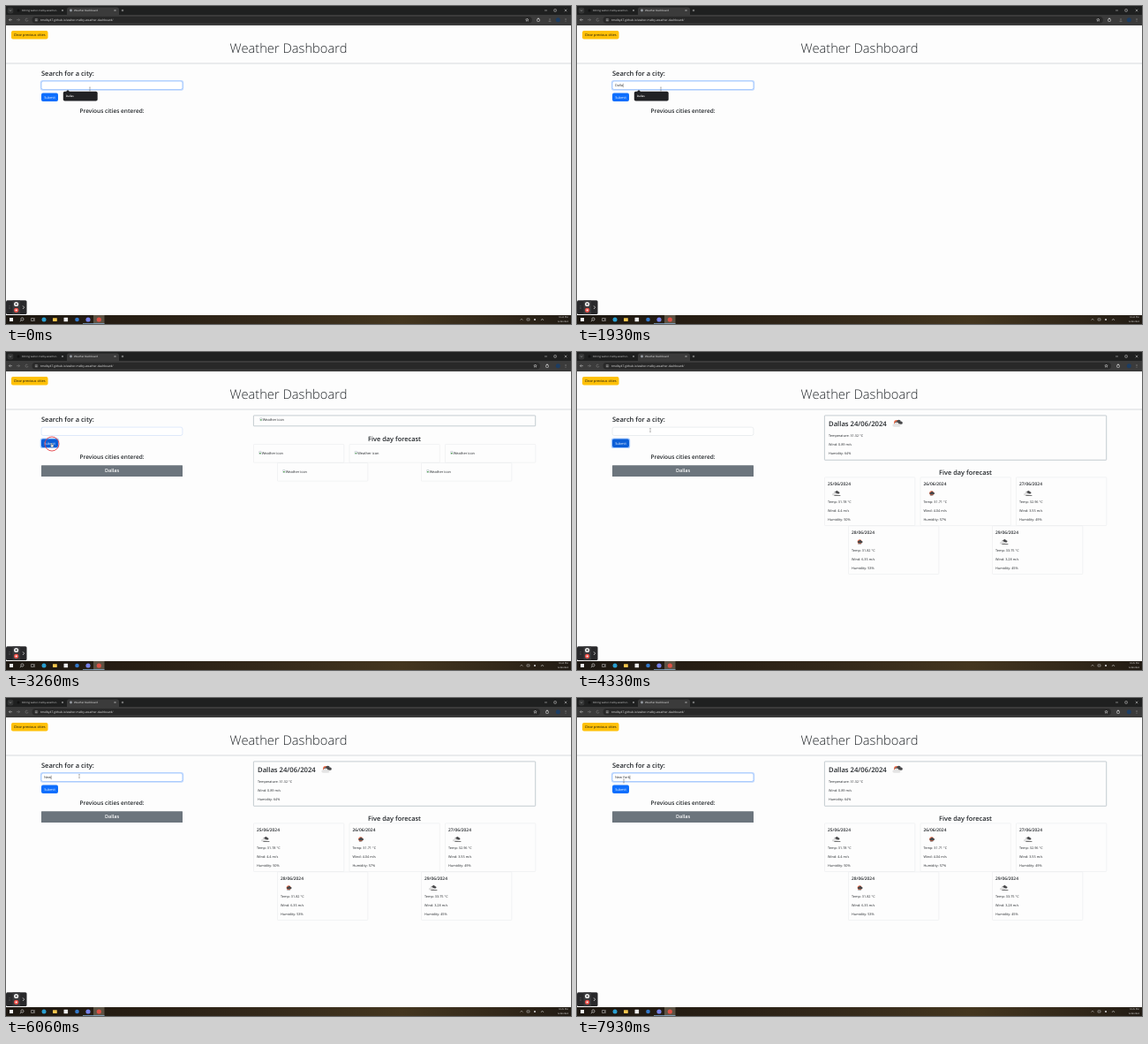
Animation of 640x360 px, one loop 8 s. Source, as an HTML page with a canvas:

```html
<!DOCTYPE html>
<html lang="en">
<head>
<meta charset="utf-8">
<title>Weather Dashboard</title>
<style>
html, body { margin: 0; width: 100%; height: 100%; overflow: hidden; background: #fdfdfd; }
canvas { display: block; width: 640px; height: 360px; }
</style>
</head>
<body>
<canvas id="stage"></canvas>
<script>
const LOOP = 8000;
const canvas = document.getElementById('stage');
const ctx = canvas.getContext('2d');
const ratio = window.devicePixelRatio || 1;
canvas.width = 640 * ratio;
canvas.height = 360 * ratio;

// Times (ms) of the events in the session
const TIME = { extension: 2400, click: 3060, result: 3130, data: 3460, clock: 3900, focus: 4600, popupOff: 5600 };

const TYPING = [
  { word: 'Dallas', start: 0, end: TIME.result, keys: [1200, 1330, 1530, 1730, 1870, 2060] },
  { word: 'New York', start: TIME.focus, end: LOOP, keys: [5600, 5800, 5990, 6260, 6400, 6530, 6660, 6860] }
];

// Pointer path: time, x, y
const POINTER = [[0, 95, 94], [2200, 95, 94], [2850, 52, 105], [3460, 52, 105],
  [4150, 83, 88.5], [7460, 83, 88.5], [7860, 53, 94], [8000, 53, 94]];

const DAYS = [
  { x: 280.5, row: 0, date: '25/06/2024', icon: 'cloud', temp: '31.78', wind: '4.4', hum: 50 },
  { x: 389, row: 0, date: '26/06/2024', icon: 'rain', temp: '31.71', wind: '4.04', hum: 57 },
  { x: 497.5, row: 0, date: '27/06/2024', icon: 'cloud', temp: '32.96', wind: '3.55', hum: 49 },
  { x: 307.5, row: 1, date: '28/06/2024', icon: 'rain', temp: '31.82', wind: '6.35', hum: 53 },
  { x: 470.5, row: 1, date: '29/06/2024', icon: 'cloud', temp: '33.75', wind: '3.28', hum: 45 }
];

function rect(x, y, w, h, fill, r = 0) {
  ctx.fillStyle = fill;
  ctx.beginPath();
  ctx.roundRect(x, y, w, h, r);
  ctx.fill();
}

function frame(x, y, w, h, color, r = 0, width = 0.6) {
  ctx.strokeStyle = color;
  ctx.lineWidth = width;
  ctx.beginPath();
  ctx.roundRect(x, y, w, h, r);
  ctx.stroke();
}

function dot(x, y, r, fill) {
  ctx.fillStyle = fill;
  ctx.beginPath();
  ctx.arc(x, y, r, 0, Math.PI * 2);
  ctx.fill();
}

function line(points, color, width = 0.5) {
  ctx.strokeStyle = color;
  ctx.lineWidth = width;
  ctx.beginPath();
  for (let i = 0; i < points.length; i += 2) ctx.lineTo(points[i], points[i + 1]);
  ctx.stroke();
}

// y is the middle of the capitals
function text(str, x, y, size, { color = '#212529', weight = 400, align = 'left' } = {}) {
  ctx.font = `${weight} ${size}px "Open Sans", "Noto Sans", sans-serif`;
  ctx.textAlign = align;
  ctx.fillStyle = color;
  ctx.fillText(str, x, y + size * 0.357);
}

function cross(x, y, r, color) {
  line([x - r, y - r, x + r, y + r], color);
  line([x - r, y + r, x + r, y - r], color);
}

function drawBrowser(t) {
  const pale = '#d8d8d8';
  rect(0, 0, 640, 11, '#1f2020');
  rect(0, 10, 640, 12, '#3b3b3b');
  rect(1.7, 1.8, 6.6, 6.6, '#343535', 2);
  line([4, 4.5, 5, 5.6, 6, 4.5], pale);
  dot(14, 5, 1.5, '#111');
  ctx.save();
  ctx.beginPath();
  ctx.rect(17, 0, 41, 10);
  ctx.clip();
  text('Editing walter-melby-weather-d', 18, 5, 2.85, { color: '#c8c8c8' });
  ctx.restore();
  cross(64, 5, 0.9, pale);

  rect(69, 1.5, 59, 10, '#3b3b3b', [2.5, 2.5, 0, 0]);
  dot(73.5, 5, 1.4, '#9a9fa6');
  text('Weather Dashboard', 77, 5, 2.9, { color: '#eee' });
  cross(123.5, 5, 0.9, pale);
  line([130.8, 5, 133.2, 5], pale);
  line([132, 3.8, 132, 6.2], pale);

  line([610, 5, 613, 5], pale);
  frame(620.8, 3.7, 2.5, 2.5, pale, 0.3, 0.5);
  cross(634, 5, 1.3, pale);

  line([7, 15.7, 3.5, 15.7, 5, 14.2], pale);
  line([3.5, 15.7, 5, 17.2], pale);
  line([12, 15.7, 15.5, 15.7, 14, 14.2], '#8a8a8a');
  line([15.5, 15.7, 14, 17.2], '#8a8a8a');
  ctx.beginPath();
  ctx.arc(23.5, 15.7, 1.5, 0.2, 5.4);
  ctx.stroke();

  const wide = t >= TIME.extension;
  const star = wide ? 599.5 : 590.3;
  rect(29.5, 12, star - 24, 7.6, '#282828', 3.8);
  dot(34.3, 15.8, 2.4, '#3b3b3b');
  line([33, 15, 35.6, 15], pale);
  line([33, 16.6, 35.6, 16.6], pale);
  text('tmelby47.github.io/walter-melby-weather-dashboard/', 39, 15.7, 3.3, { color: '#e6e6e6' });

  ctx.beginPath();
  for (let i = 0; i < 10; i++) {
    const a = i * Math.PI / 5 - Math.PI / 2, r = i % 2 ? 0.8 : 1.8;
    ctx.lineTo(star + r * Math.cos(a), 15.8 + r * Math.sin(a));
  }
  ctx.closePath();
  ctx.strokeStyle = pale;
  ctx.stroke();

  const puzzle = wide ? 613 : 603;
  frame(puzzle - 1.4, 14.6, 2.8, 2.8, pale, 0.5);
  dot(puzzle, 14.3, 0.8, pale);
  if (!wide) {
    line([616, 14, 616, 16.4], '#a0a0a0');
    line([614.6, 17.3, 617.4, 17.3], '#a0a0a0');
  }
  dot(625.3, 15.7, 2.5, '#1c3d63');
  for (const dy of [-1.4, 0, 1.4]) dot(634, 15.7 + dy, 0.4, pale);
}

function drawTaskbar(t) {
  const shade = ctx.createLinearGradient(0, 0, 640, 0);
  [[0, '#1d1812'], [0.2, '#261d13'], [0.45, '#33281a'], [0.7, '#44361f'], [0.9, '#302619'], [1, '#211b14']]
    .forEach(([at, color]) => shade.addColorStop(at, color));
  rect(0, 350, 640, 10, shade);

  rect(4, 353, 4, 4, '#eee');
  ctx.strokeStyle = '#eee';
  ctx.lineWidth = 0.6;
  ctx.beginPath();
  ctx.arc(18.4, 354.5, 1.6, 0, Math.PI * 2);
  ctx.stroke();
  line([17.2, 355.7, 15.9, 357.2], '#eee', 0.6);
  frame(28.5, 353.5, 2.8, 3, '#ccc', 0, 0.5);
  line([32.2, 353, 32.2, 357], '#ccc');

  rect(99, 350, 12.5, 10, '#5d5344');
  dot(43, 355, 2.5, '#2a9fd0');
  rect(53, 353.2, 4.8, 3.8, '#f4c64e', 0.4);
  rect(65.5, 352.7, 4.6, 4.6, '#ececec', 0.4);
  dot(80.5, 355, 2.3, '#3478c8');
  dot(93, 355, 2.6, '#7681e8');
  dot(105.3, 355, 2.6, '#dd5145');
  rect(87, 359.3, 12, 0.7, '#8cb6dd');
  rect(99, 359.3, 12.5, 0.7, '#8cb6dd');

  line([582.5, 355.6, 584, 354.2, 585.5, 355.6], '#ddd');
  frame(590, 353.8, 3, 2.2, '#ddd', 0, 0.45);
  dot(599, 355, 1, '#ddd');
  line([606, 356, 607.5, 354, 609, 356], '#ddd');
  const pale = { color: '#eee', align: 'center' };
  text(t < TIME.clock ? '10:24 PM' : '10:25 PM', 631, 352.6, 2.5, pale);
  text('6/24/2024', 631, 357.2, 2.5, pale);
}

function drawRecorder() {
  rect(0, 333.3, 23.5, 15.8, '#29292b', 1.5);
  rect(7.5, 333.3, 8.5, 15.8, '#39393b');
  for (const dy of [-1.5, 0, 1.5]) dot(4, 341.2 + dy, 0.35, '#aaa');
  dot(11.6, 337.5, 2.6, '#eee');
  rect(10.7, 336.6, 1.8, 1.8, '#444');
  dot(11.6, 344.3, 2.6, '#ee4f48');
  rect(10.7, 343.4, 1.8, 1.8, '#fff', 0.3);
  line([19, 339.4, 20.6, 341.2, 19, 343], '#eee', 0.7);
}

function drawSearch(t) {
  const entry = TYPING.find(e => t >= e.start && t < e.end);
  text('Search for a city:', 40, 76.8, 7.5, { weight: 600 });

  if (entry) rect(38.8, 83.9, 162.4, 11.8, '#c3dafe', 2.6);
  rect(40, 85, 160, 9.6, '#fff', 2);
  const fading = t >= TIME.result && t < TIME.data;
  frame(40.1, 85.1, 159.8, 9.4, entry ? '#86b7fe' : fading ? '#c9dcf8' : '#dee2e6', 2);

  if (entry) {
    const typed = entry.keys.filter(k => k <= t);
    const value = entry.word.slice(0, typed.length);
    text(value, 43, 90, 3.8);
    const since = t - (typed[typed.length - 1] ?? entry.start);
    if (typed.length && since % 1000 < 500) {
      const x = 43.3 + ctx.measureText(value).width;
      line([x, 87.7, x, 92.2], '#222', 0.4);
    }
  }

  const active = t >= 2800 && t < TIME.focus;
  if (t >= TIME.result && t < TIME.focus) rect(38.8, 97.4, 21.4, 11.6, '#a9ccff', 2.6);
  rect(40, 98.5, 19, 9.4, active ? '#0b5ed7' : '#0d6efd', 1.9);
  text('Submit', 49.5, 103.3, 3.85, { color: '#fff', align: 'center' });

  text('Previous cities entered:', 120, 118.6, 6.5, { weight: 600, align: 'center' });
  if (t >= TIME.result) {
    rect(40, 128.2, 160, 12.7, '#6c757d', 0.5);
    text('Dallas', 120, 134.4, 5.5, { weight: 600, color: '#fff', align: 'center' });
  }

  if (t < 2300 || (t >= TIME.focus && t < TIME.popupOff)) {
    ctx.fillStyle = '#202124';
    ctx.beginPath();
    ctx.moveTo(67.8, 97.2);
    ctx.lineTo(70, 95);
    ctx.lineTo(72.2, 97.2);
    ctx.fill();
    rect(64.8, 96.8, 38.9, 10.7, '#202124', 1.8);
    text('Dallas', 67.7, 102.3, 3.1, { color: '#f4f4f4', weight: 600 });
  }
}

function cloud(x, y, s, fill) {
  ctx.fillStyle = fill;
  ctx.beginPath();
  ctx.arc(x - 2 * s, y, 1.2 * s, 0, 7);
  ctx.arc(x, y - 0.8 * s, 1.7 * s, 0, 7);
  ctx.arc(x + 2 * s, y, 1.2 * s, 0, 7);
  ctx.rect(x - 2 * s, y - 0.4 * s, 4 * s, 1.6 * s);
  ctx.fill();
}

function weatherIcon(kind, x, y) {
  if (kind === 'sun') {
    dot(x - 0.5, y - 1, 3, '#ec6e4c');
    cloud(x + 2, y - 0.8, 1.35, '#48484a');
    cloud(x - 0.5, y + 2, 1.45, '#e4e4e4');
  } else if (kind === 'rain') {
    dot(x - 0.2, y - 0.4, 2.5, '#ec6e4c');
    cloud(x + 0.3, y, 0.9, '#48484a');
    for (const dx of [-1.2, 0, 1.2]) line([x + dx, y + 1.4, x + dx - 0.4, y + 2.7], '#48484a', 0.6);
  } else {
    cloud(x + 1, y - 0.7, 0.95, '#48484a');
    cloud(x - 1.3, y + 1.2, 1, '#dedede');
    line([x - 2, y + 2.4, x + 5, y + 2.4], '#555', 0.8);
  }
}

function brokenImage(x, y) {
  frame(x, y - 1.8, 2.3, 3, '#8c9aa8', 0.2, 0.35);
  rect(x + 0.3, y - 0.2, 1.7, 1.1, '#5ba85a');
  text('Weather icon', x + 3, y, 3.95);
}

function drawForecast(loaded) {
  frame(280.4, 71.9, 319.3, loaded ? 50.4 : 11.9, '#adb8bf', 0.5, 0.7);
  if (loaded) {
    text('Dallas 24/06/2024', 285, 81.5, 7.7, { weight: 600 });
    weatherIcon('sun', 362.5, 81);
    ['Temperature: 31.32 °C', 'Wind: 0.89 m/s', 'Humidity: 64%']
      .forEach((s, i) => text(s, 285, 95 + i * 10, 3.75));
  } else {
    brokenImage(287.7, 76.5);
  }
  text('Five day forecast', 440, loaded ? 136 : 98, 7.4, { weight: 600, align: 'center' });

  for (const day of DAYS) {
    const step = loaded ? 55 : 21;
    const top = (loaded ? 141.8 : 104.5) + day.row * step;
    frame(day.x, top, 102.3, step - 0.3, '#e6e8ea', 0.6, 0.5);
    if (!loaded) {
      brokenImage(day.x + 6.2, top + 9.8);
      continue;
    }
    const x = day.x + 3.5;
    text(day.date, x, top + 7.8, 4.85, { weight: 600 });
    weatherIcon(day.icon, x + 9.4, top + 18.3);
    [`Temp: ${day.temp} °C`, `Wind: ${day.wind} m/s`, `Humidity: ${day.hum}%`]
      .forEach((s, i) => text(s, x, top + 28.3 + i * 10, 3.8));
  }
}

function pointerAt(t) {
  const i = Math.max(1, POINTER.findIndex(p => p[0] > t));
  const [t0, x0, y0] = POINTER[i - 1], [t1, x1, y1] = POINTER[i];
  const k = (t - t0) / (t1 - t0), e = k * k * (3 - 2 * k);
  return [x0 + (x1 - x0) * e, y0 + (y1 - y0) * e];
}

function drawPointer(t) {
  const [x, y] = pointerAt(t);
  if (t >= TIME.click && t < TIME.data) {
    const r = 8 * Math.min(1, 0.5 + (t - TIME.click) / 300);
    ctx.strokeStyle = '#e8444a';
    ctx.lineWidth = 0.9;
    ctx.beginPath();
    ctx.arc(x, 104, r, 0, Math.PI * 2);
    ctx.stroke();
  }
  if (y > 98 && x < 59) {
    rect(x - 1.4, y - 0.2, 3.2, 3, '#fff', 0.8);
    frame(x - 1.4, y - 0.2, 3.2, 3, '#222', 0.8, 0.35);
    rect(x - 0.8, y - 2, 1, 3, '#fff', 0.5);
    frame(x - 0.8, y - 2, 1, 3, '#222', 0.5, 0.3);
  } else if (y > 84 && y < 95) {
    line([x, y - 2, x, y + 2], '#555', 0.4);
    line([x - 0.8, y - 2, x + 0.8, y - 2], '#555', 0.35);
    line([x - 0.8, y + 2, x + 0.8, y + 2], '#555', 0.35);
  } else {
    ctx.beginPath();
    [[0, 0], [0, 4.2], [1, 3.3], [2.8, 3]].forEach(([dx, dy]) => ctx.lineTo(x + dx, y + dy));
    ctx.closePath();
    ctx.fillStyle = '#fff';
    ctx.fill();
    ctx.strokeStyle = '#222';
    ctx.lineWidth = 0.35;
    ctx.stroke();
  }
}

function draw(t) {
  ctx.setTransform(ratio, 0, 0, ratio, 0, 0);
  ctx.textRendering = 'geometricPrecision';
  rect(0, 0, 640, 360, '#fdfdfd');
  drawBrowser(t);
  rect(6, 28, 41.5, 9.5, '#ffc107', 1.9);
  text('Clear previous cities', 26.7, 32.8, 3.85, { align: 'center', color: '#111' });
  text('Weather Dashboard', 320, 47.8, 14.7, { weight: 300, align: 'center' });
  line([0, 65, 640, 65], '#c6cbce', 0.7);
  drawSearch(t);
  if (t >= TIME.result) drawForecast(t >= TIME.data);
  drawTaskbar(t);
  drawRecorder();
  drawPointer(t);
}

const begin = performance.now();
function tick() {
  draw((performance.now() - begin) % LOOP);
  requestAnimationFrame(tick);
}
tick();
</script>
</body>
</html>
```
